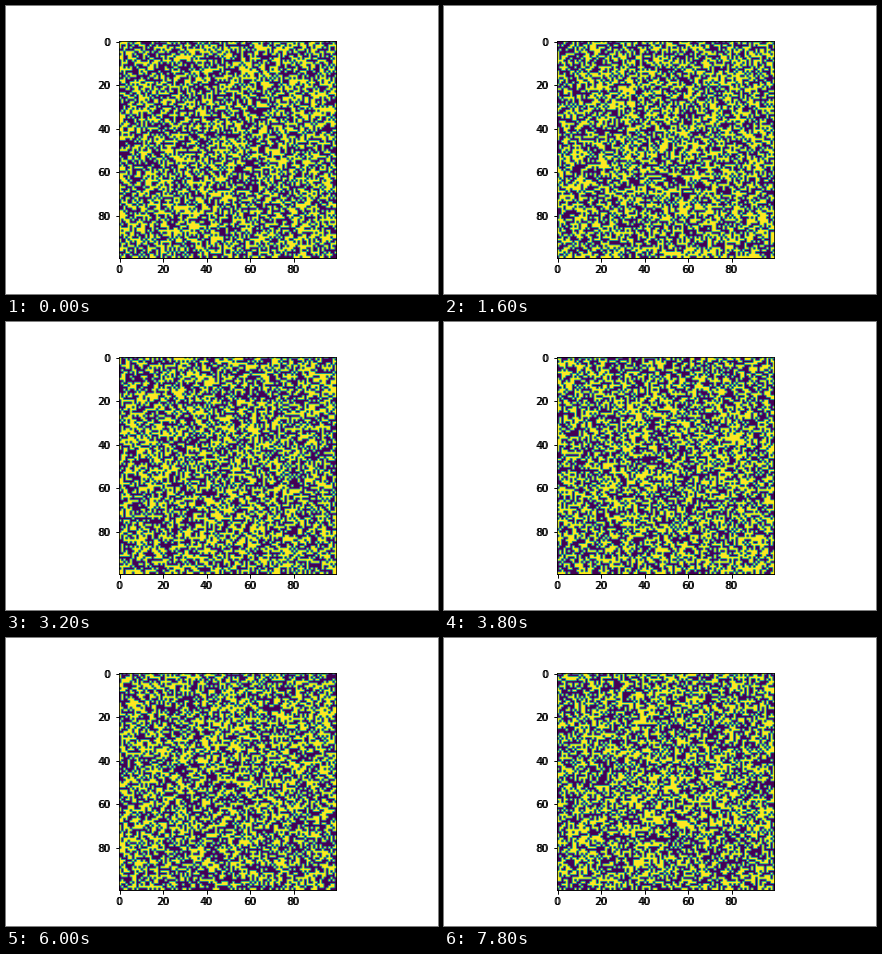
Write a matplotlib script that moves like this. It is 432 by 288 pixels and loops after 8000 ms.

```python
import numpy as np
import matplotlib.pyplot as plt
from matplotlib.animation import FuncAnimation
from matplotlib.transforms import Affine2D

N = 100
FRAMES = 40
INTERVAL = 200

plt.rcParams["font.family"] = "DejaVu Sans"
plt.rcParams["font.size"] = 10


def spins(frame):
    """Random two-state lattice, fixed for each frame number."""
    return np.random.default_rng(1000 + frame).integers(0, 2, (N, N))


def add_layer(x_shift, y_shift):
    """Add a lattice plot whose tick labels are moved sideways, in pixels."""
    ax = fig.add_subplot()
    img = ax.imshow(spins(0), cmap="viridis", vmin=0, vmax=1)
    for axis, shift in ((ax.xaxis, x_shift), (ax.yaxis, y_shift)):
        move = Affine2D().translate(shift, 0)
        for label in axis.get_majorticklabels():
            label.set_transform(label.get_transform() + move)
    return img


fig = plt.figure(figsize=(6, 4), dpi=72, facecolor="white")
fig.subplots_adjust(left=0.125, right=0.9, bottom=0.125, top=0.88)

# Two layers one pixel apart give the heavy, smudged lettering.
add_layer(-1, -2)
img = add_layer(0, -1)


def update(frame):
    img.set_data(spins(frame))
    return [img]


anim = FuncAnimation(fig, update, frames=FRAMES, interval=INTERVAL,
                     init_func=lambda: update(0), repeat=True, repeat_delay=0)
plt.show()
```
